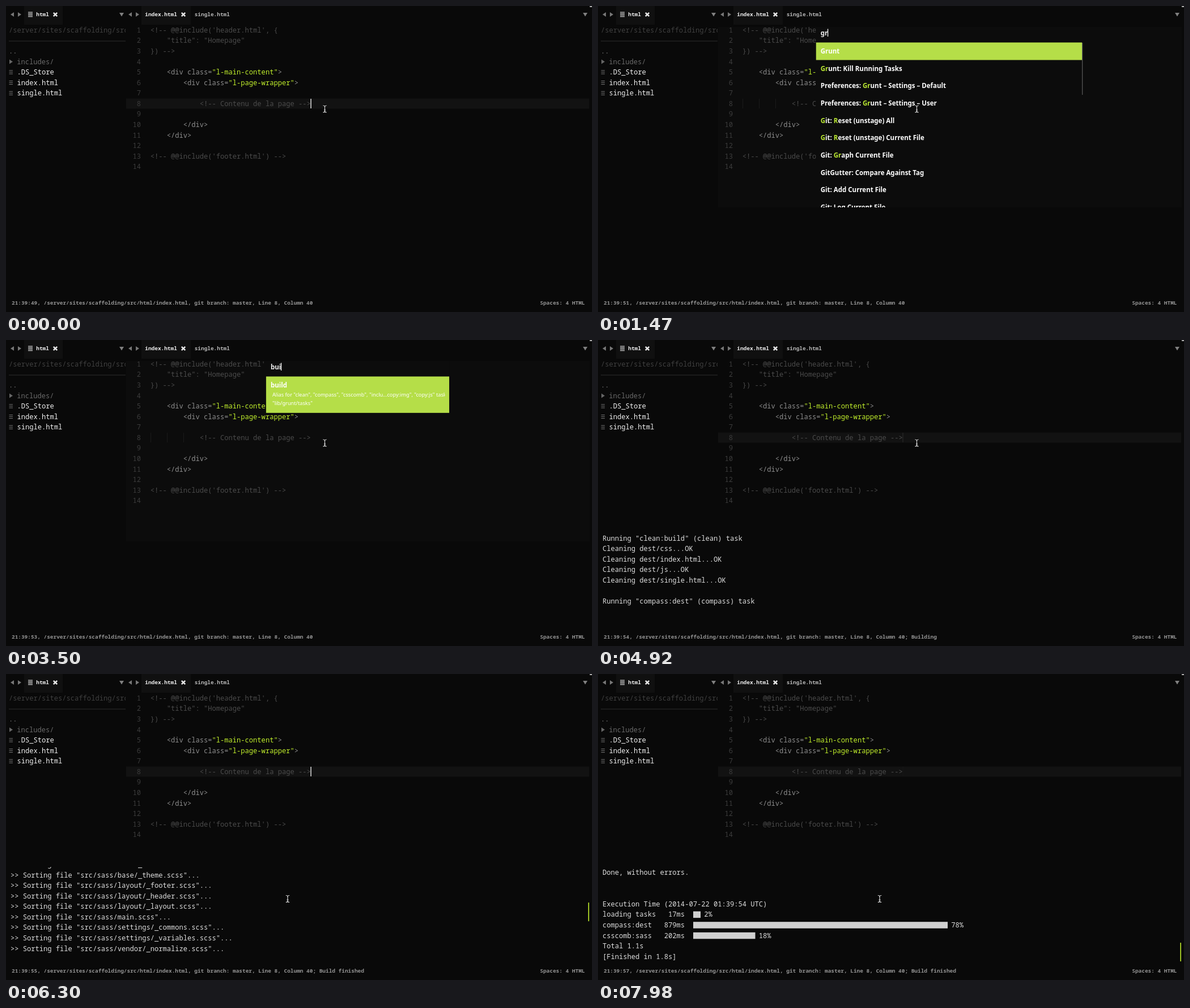
These frames come from a looping animation (1034x541 px, 8000 ms). An HTML page with a canvas:

```html
<!DOCTYPE html>
<html lang="en">
<head>
<meta charset="utf-8">
<title>Editor build</title>
<style>
html, body { margin: 0; width: 100%; height: 100%; overflow: hidden; background: #090909; }
canvas { display: block; }
</style>
</head>
<body>
<canvas id="stage" width="1034" height="541"></canvas>
<script>
const ctx = document.getElementById('stage').getContext('2d');
const LOOP = 8000, ROW = 18.57;
const MONO = '"Noto Sans Mono", monospace', SANS = '"Noto Sans", "Open Sans", sans-serif';
const CODE = '12.1px ' + MONO, SMALL = '600 9.43px ' + MONO, TAB = '700 9.43px ' + MONO;
const UI = '600 11.5px ' + SANS, UI_BOLD = '700 11.5px ' + SANS, HINT = '500 9.2px ' + SANS;
const KEYS = '9.4px "DejaVu Sans", sans-serif';
const BG = '#090909', PANEL = '#0c0c0c', LIME = '#b5de48', BRIGHT = '#c2f02c', WHITE = '#fff';

const code = `<!-- @@include('header.html', {
    "title": "Homepage"
}) -->

    <div class="l-main-content">
        <div class="l-page-wrapper">

            <!-- Contenu de la page -->

        </div>
    </div>

<!-- @@include('footer.html') -->
`.split('\n');

const commands = [
  ['Abacus: align selection', '⇧⌘A'], ['About'], ['Align cursor'],
  ['Bookmarks: Clear All', '⇧⌘F2'], ['Bookmarks: Select All'], ['Bookmarks: Select Next'],
  ['Bookmarks: Select Previous'], ['Bookmarks: Toggle', '⌘F2'],
  ['Browse Mode...'], ['Browse Mode: Current file or project']
];
// braces mark the letters matched by the query
const matches = [
  '{Grunt}', '{Grunt}: Kill Running Tasks', 'Preferences: {Grunt} – Settings – Default',
  'Preferences: {Grunt} – Settings – User', '{G}it: {R}eset ({un}s{t}age) All',
  '{G}it: {R}eset ({un}s{t}age) Current File', 'Git: {Gr}aph C{u}rre{nt} File',
  'GitGutter: Compare Against Tag', 'Git: Add Current File', 'Git: Log Current File'
].map(s => [s]);
const tasks = [
  ['{build}', 'Alias for "clean", "compass", "csscomb", "inclu…copy:img", "copy:js" tasks.', '"lib/grunt/tasks"'],
  ['clean', 'Clean files and folders.', '"grunt-contrib-clean/tasks"'],
  ['compass', 'Compile Sass to CSS using Compass', '"grunt-contrib-compass/tasks"'],
  ['copy', 'Copy files.', '"grunt-contrib-copy/tasks"'],
  ['csscomb', 'Sorting CSS properties in specific order.', '"grunt-csscomb/tasks"']
];

const sorted = ['base/_base', 'base/_fonts', 'base/_helpers', 'base/_mixins', 'base/_reset',
  'base/_theme', 'layout/_footer', 'layout/_header', 'layout/_layout', 'main',
  'settings/_commons', 'settings/_variables', 'vendor/_normalize'];
const output = [
  'Running "clean:build" (clean) task',
  ...['css', 'index.html', 'js', 'single.html'].map(f => `Cleaning dest/${f}...OK`),
  '', 'Running "compass:dest" (compass) task',
  'directory dest/css', '   create dest/css/main.css', 'Compilation took 0.6s',
  '', 'Running "csscomb:sass" (csscomb) task',
  ...sorted.map(f => `>> Sorting file "src/sass/${f}.scss"...`),
  '', 'Running "includes:build" (includes) task',
  '', 'Running "copy:img" (copy) task', 'Copied 6 files',
  '', 'Running "copy:js" (copy) task', 'Copied 2 files', '', '',
  'Done, without errors.', '', '', 'Execution Time (2014-07-22 01:39:54 UTC)',
  'loading tasks   17ms', 'compass:dest   879ms', 'csscomb:sass   202ms',
  'Total 1.1s', '[Finished in 1.8s]'
];
const bars = { 'loading': [13, '2%'], 'compass:dest ': [449, '78%'], 'csscomb:sass ': [109.5, '18%'] };

// value of the last [time, value] step that has begun
const stepAt = (steps, t) => steps.reduce((v, [at, next]) => t >= at ? next : v, steps[0][1]);
const count = (times, t) => times.filter(at => t >= at).length;
const blink = (t, start) => Math.min(1, .52 + .52 * Math.cos((t - start) / 1040 * 2 * Math.PI));

const TICKS = [420, 1420, 2530, 3500, 4420, 5420, 6450, 7420];
const GRUNT = [1260, 1420, 1600, 1800, 1980];
const BUILD = [2980, 3200, 3500, 3690, 3880];
const LINES = [[0, 0], [4640, 5], [4920, 7], [5640, 10], [5780, 18], [5880, 25], [5980, output.length]];
const SCROLL = [[0, 0], [6080, 60], [6190, 180], [6300, 310.8], [6450, 400], [6580, 500], [6700, 585], [6830, 649.5]];

function rect(x, y, w, h, color) {
  ctx.fillStyle = color;
  ctx.fillRect(x, y, w, h);
}
function text(str, x, y, color, font = CODE, align = 'left') {
  ctx.font = font;
  ctx.textAlign = align;
  ctx.fillStyle = color;
  ctx.fillText(str, x, y);
  return x + ctx.measureText(str).width;
}
function poly(points, color) {
  ctx.beginPath();
  points.forEach(([x, y]) => ctx.lineTo(x, y));
  ctx.closePath();
  ctx.fillStyle = color;
  ctx.fill();
}
function clipped(x, y, w, h, draw) {
  ctx.save();
  ctx.beginPath();
  ctx.rect(x, y, w, h);
  ctx.clip();
  draw();
  ctx.restore();
}
function caret(x, y, h, alpha) {
  ctx.globalAlpha = Math.max(0, alpha);
  rect(x, y, 1.3, h, WHITE);
  ctx.globalAlpha = 1;
}
const side = (x, dir, color = '#777', y = 15) => poly([[x - 3 * dir, y - 4], [x + 3 * dir, y], [x - 3 * dir, y + 4]], color);
const down = x => poly([[x - 4, 12], [x + 4, 12], [x, 18.5]], '#808080');
function cross(x, y) {
  ctx.strokeStyle = '#e8e8e8';
  ctx.lineWidth = 2.6;
  ctx.beginPath();
  for (const d of [-1, 1]) {
    ctx.moveTo(x - 3.2, y - 3.2 * d);
    ctx.lineTo(x + 3.2, y + 3.2 * d);
  }
  ctx.stroke();
}

function tabs() {
  rect(32, 0, 68, 33, '#101010');
  rect(239, 0, 87, 33, '#101010');
  for (const x of [11, 219]) {
    side(x, -1);
    side(x + 13, 1);
  }
  for (let i = 0; i < 4; i++) rect(39, 10.5 + i * 2.5, 8, 1.3, '#ccc');
  text('html', 53.3, 18.3, '#ececec', TAB);
  text('index.html', 245.3, 18.3, '#ececec', TAB);
  text('single.html', 332.7, 18.3, '#b4b4b4', SMALL);
  cross(87, 15);
  cross(313, 15);
  down(204);
  down(1022);
  rect(1030, 0, 4, 2, '#aaa');
}

function sidebar() {
  clipped(0, 34, 211, 130, () => {
    text('/server/sites/scaffolding/src/html', 5, 46.8, '#404040');
    rect(5, 61.5, 206, 1, '#2e2e2e');
    text('..', 5, 84, '#777');
    side(9, 1, '#666', 98.5);
    text('includes/', 19.3, 102.5, '#6a6a6a');
    ['.DS_Store', 'index.html', 'single.html'].forEach((name, i) => {
      const y = 117 + i * ROW;
      for (const d of [-3, 0, 3]) rect(5.5, y + d - .5, 6.5, 1, '#777');
      text(name, 19.5, y + 4.2, '#f0f0f0', '500 ' + CODE);
    });
  });
}

function editor(t, focused) {
  if (focused) rect(212, 163.5, 817, 18, '#121212');
  else {
    rect(212, 37, 818, 319, PANEL);
    for (const x of [255, 284, 313]) rect(x, 164, 1, 17, '#1a1a1a');
  }
  code.forEach((line, i) => {
    const y = 46.8 + i * ROW;
    text(i + 1, 238, y, '#3c3c3c', CODE, 'right');
    const base = line.includes('div') ? '#8e8e8e' : '#4b4b4b';
    let x = 254.7;
    for (const part of line.split(/("l-[^"]+")/)) x = text(part, x, y, part.startsWith('"l-') ? BRIGHT : base);
  });
  if (focused) caret(537.4, 164, 17, blink(t, t < 1000 ? 0 : 4300));
}

// draws a label, emphasising the first n marked letters
function label(str, x, y, n, color) {
  let marked = false;
  for (const part of str.split(/([{}])/)) {
    if (part === '{' || part === '}') {
      marked = part === '{';
      continue;
    }
    const hits = marked ? part.slice(0, Math.max(0, n)) : '';
    n -= hits.length;
    x = text(hits, x, y, color, UI_BOLD);
    x = text(part.slice(hits.length), x, y, WHITE, UI);
  }
}

function panel(x, w, h, rowH, items, query, caretAlpha) {
  const pad = x + 8.2;
  rect(x, 37, w, h - 37, PANEL);
  const end = text(query, pad, 51.6, '#eee', UI);
  caret(end - .3, 40.5, 13.5, caretAlpha);
  clipped(x, 64, w, h - 64, () => items.forEach(([name, hint, path], i) => {
    const y = 65 + i * rowH;
    if (!i) rect(x, 64.5, w, rowH + .35, LIME);
    label(name, pad, y + 19, query.length, i ? '#b9e632' : WHITE);
    if (path) clipped(pad, y, w - 16, rowH, () => {
      text(hint, pad + 3, y + 34.5, WHITE, HINT);
      text(path, pad + 3, y + 49.5, WHITE, HINT);
    });
    else if (hint) text(hint, x + w - 8.5, y + 17.5, i ? '#aaa' : WHITE, KEYS, 'right');
  }));
}

function panels(t) {
  if (t >= 900 && t < 2260) {
    const n = count(GRUNT, t);
    panel(384.5, n ? 469.5 : 471, 356, 30.65, n ? matches : commands, 'grunt'.slice(0, n), 1);
    if (n) rect(854, 65, 1.3, 92, '#555');
  } else if (t >= 2260 && t < 4320) {
    const n = count(BUILD, t);
    panel(458.7, 323.5, n ? 129.5 : 356, 64, n ? tasks.slice(0, 1) : tasks, 'build'.slice(0, n), n ? 1 : blink(t, 2480));
  }
}

function consolePane(t) {
  const scroll = stepAt(SCROLL, t);
  rect(0, 341, 1034, 168, BG);
  clipped(0, 341, 1034, 168, () => {
    output.slice(0, stepAt(LINES, t)).forEach((line, i) => {
      const y = 354.7 + i * ROW - scroll;
      text(line, 8, y, '#dedede');
      for (const key in bars) if (line.startsWith(key)) {
        const [w, share] = bars[key];
        rect(168, y - 9.8, w, 11.5, '#d0d0d0');
        text(share, 174.3 + w, y, '#dedede');
      }
    });
  });
  if (scroll) rect(1027.3, 339 + scroll * .2095, 1.6, 33, BRIGHT);
}

function status(t) {
  const building = t < 4320 ? '' : t < 5980 ? '; Building' : '; Build finished';
  text(`21:39:${49 + count(TICKS, t)}, /server/sites/scaffolding/src/html/index.html, git branch: master, Line 8, Column 40${building}`,
    10, 528, '#929292', SMALL);
  text('Spaces: 4 HTML', 942.3, 528, '#929292', SMALL);
}

function pointer(t) {
  if (t >= 900 && t < 1260) {
    const arrow = [[562, 178], [562, 190], [564.7, 187.6], [566.7, 191.6], [568.6, 190.7], [566.8, 186.8], [570, 186.5]];
    poly(arrow, '#111');
    ctx.strokeStyle = '#eee';
    ctx.lineWidth = 1.1;
    ctx.stroke();
    return;
  }
  const p = Math.min(1, Math.max(0, (t - 5420) / 560)), e = p * p * (3 - 2 * p);
  const x = 562.5 - 65.5 * e, y = 182 + 215.5 * e;
  for (const [color, width] of [['#000', 3], ['#e4e4e4', 1.2]]) {
    ctx.strokeStyle = color;
    ctx.lineWidth = width;
    ctx.beginPath();
    for (const d of [-1, 1]) {
      ctx.moveTo(x - 3.2, y + 6 * d);
      ctx.quadraticCurveTo(x, y + 6 * d, x, y + 4 * d);
      ctx.quadraticCurveTo(x, y + 6 * d, x + 3.2, y + 6 * d);
    }
    ctx.moveTo(x, y - 5);
    ctx.lineTo(x, y + 5);
    ctx.moveTo(x - 1.6, y + 2);
    ctx.lineTo(x + 1.6, y + 2);
    ctx.stroke();
  }
}

function frame(now) {
  const t = now % LOOP;
  rect(0, 0, 1034, 541, BG);
  tabs();
  sidebar();
  editor(t, t < 900 || t >= 4320);
  panels(t);
  if (t >= 4320) consolePane(t);
  status(t);
  pointer(t);
  requestAnimationFrame(frame);
}
requestAnimationFrame(frame);
</script>
</body>
</html>
```
